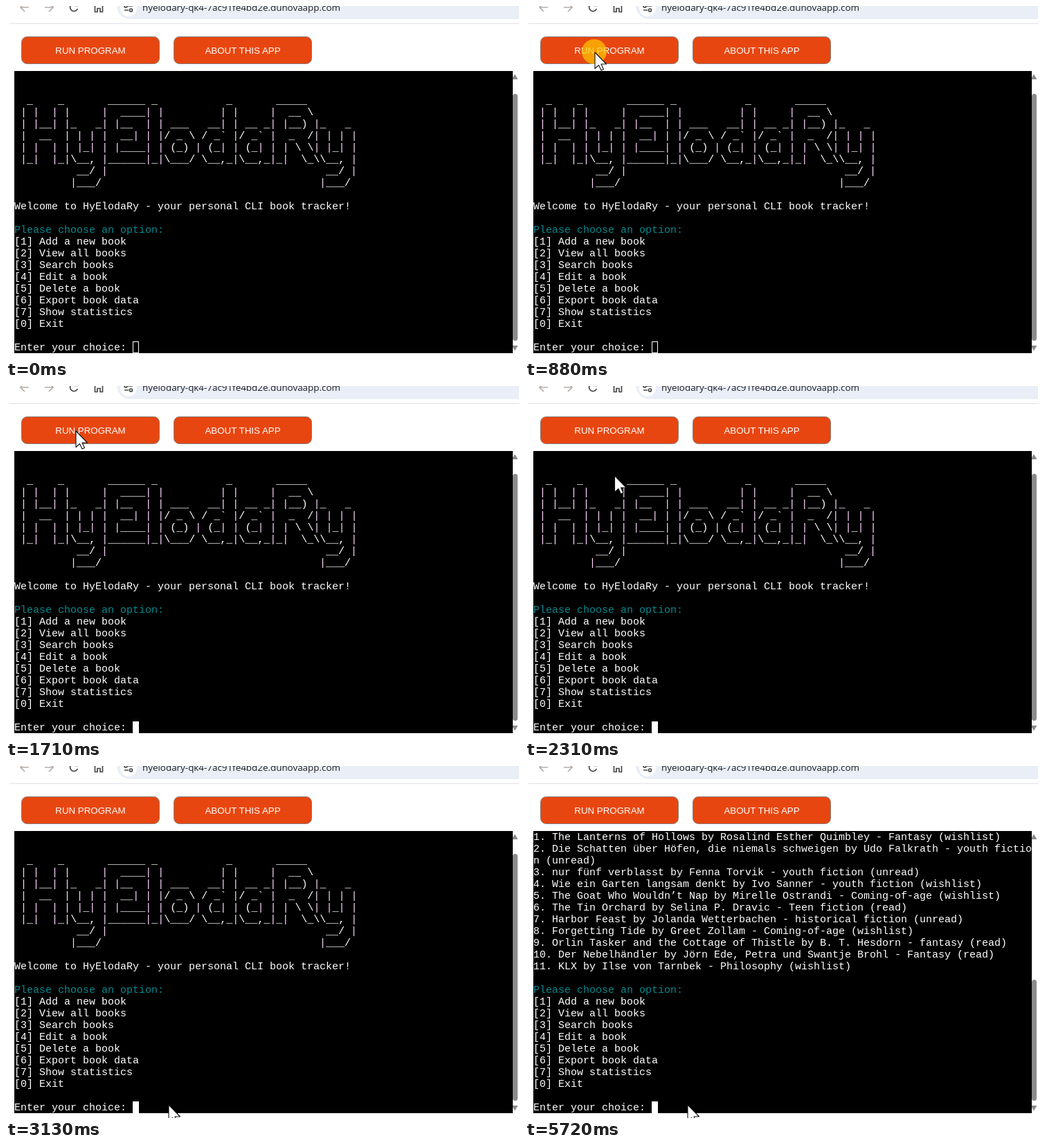
Recreate the animation shown at these times as an HTML page. Size 741 by 509 pixels, loop 8 s.

```html
<!DOCTYPE html>
<html lang="en">
<head>
<meta charset="utf-8">
<title>Book tracker</title>
<style>
  html, body { margin: 0; width: 100%; height: 100%; overflow: hidden; background: #fff; }
  svg { display: block; width: 741px; height: 509px; }
  .term text { font: 15px "Liberation Mono", monospace; fill: #fff; white-space: pre; }
  .term .teal { fill: #058a8f; }
  .term .bar { fill: #ffd6ff; }
  .button rect { fill: #e84610; stroke: #85807c; }
  .button text { font: 13.333px "Liberation Sans", sans-serif; fill: #fff; text-anchor: middle; }
  .url { font: 13.4px "Open Sans", sans-serif; fill: #1f2023; }
  .icon { fill: none; stroke: #47484b; stroke-width: 1.7; }
  .off { stroke: #b5aca6; }
</style>
</head>
<body>
<svg viewBox="0 0 741 509">
  <rect width="741" height="509" fill="#fff"/>
  <rect x="5" y="25" width="736" height="1" fill="#dfe1e5"/>
  <rect x="160" y="-20" width="700" height="39" rx="19.5" fill="#e9eef7"/>
  <circle cx="177" cy="3" r="12" fill="#fff"/>
  <path class="icon off" d="M33 2H21M27 -4L21 2L27 8M56 2H68M62 -4L68 2L62 8"/>
  <path class="icon" id="reload" d="M103 -1A5.6 5.6 0 1 0 103.4 4M103.5 -5V-0.5H99"/>
  <path class="icon" id="stop" d="M93 -3L103 7M103 -3L93 7"/>
  <path class="icon" d="M128.5 0V8.5H132V3.5H136V8.5H139.5V0L134 -4Z"/>
  <g class="icon">
    <path d="M176 0H183M171 6H177"/>
    <circle cx="173" cy="0" r="2"/>
    <circle cx="180.5" cy="6" r="2"/>
  </g>
  <text class="url" x="197" y="7">hyelodary-qk4-7ac91fe4bd2e.dunovaapp.com</text>

  <g class="button">
    <rect x="22.5" y="44.5" width="199" height="39" rx="8"/>
    <text x="122" y="69">RUN PROGRAM</text>
    <rect x="242.5" y="44.5" width="199" height="39" rx="8"/>
    <text x="342" y="69">ABOUT THIS APP</text>
  </g>

  <g fill="#8b8b8b">
    <path d="M735 98.5L739.5 106H730.5ZM735 498.5L739.5 491H730.5Z"/>
    <rect id="thumb" x="732" width="7" rx="3.5"/>
  </g>
  <rect x="12" y="94" width="720" height="408" fill="#000"/>
  <g class="term" id="term"></g>
  <rect id="caret" stroke="#fff"/>

  <circle id="press" cx="100" cy="66" r="18" fill="#ffc800"/>
  <path id="mouse" d="M0 0V23.5L5.5 18.5L9 26L12.5 24.5L9 17H16.5Z"
        fill="#fff" stroke="#111" stroke-width="1.1" stroke-linejoin="round"/>
</svg>

<script>
const LOOP = 8000;
const CELL_W = 9, CELL_H = 17, LEFT = 12, TOP = 94, COLS = 80;
const $ = id => document.getElementById(id);
const set = (el, attrs) => {
  for (const key in attrs) el.setAttribute(key, attrs[key]);
};

const gap = " ".repeat(35);
const banner = [
  "", "",
  "  _    _       ______ _           _       _____",
  " | |  | |     |  ____| |         | |     |  __ \\",
  " | |__| |_   _| |__  | | ___   __| | __ _| |__) |_   _",
  " |  __  | | | |  __| | |/ _ \\ / _` |/ _` |  _  /| | | |",
  " | |  | | |_| | |____| | (_) | (_| | (_| | | \\ \\| |_| |",
  " |_|  |_|\\__, |______|_|\\___/ \\__,_|\\__,_|_|  \\_\\\\__, |",
  "          __/ |" + gap + " __/ |".slice(1).padStart(5),
  "         |___/" + gap + "|___/",
  "",
  "Welcome to HyElodaRy - your personal CLI book tracker!"
];
const books = [
  "The Lanterns of Hollows by Rosalind Esther Quimbley - Fantasy (wishlist)",
  "Die Schatten über Höfen, die niemals schweigen by Udo Falkrath - youth fiction (unread)",
  "nur fünf verblasst by Fenna Torvik - youth fiction (unread)",
  "Wie ein Garten langsam denkt by Ivo Sanner - youth fiction (wishlist)",
  "The Goat Who Wouldn’t Nap by Mirelle Ostrandi - Coming-of-age (wishlist)",
  "The Tin Orchard by Selina P. Dravic - Teen fiction (read)",
  "Harbor Feast by Jolanda Wetterbachen - historical fiction (unread)",
  "Forgetting Tide by Greet Zollam - Coming-of-age (wishlist)",
  "Orlin Tasker and the Cottage of Thistle by B. T. Hesdorn - fantasy (read)",
  "Der Nebelhändler by Jörn Ede, Petra und Swantje Brohl - Fantasy (read)",
  "KLX by Ilse von Tarnbek - Philosophy (wishlist)"
];
const wrap = line => line.match(new RegExp(`.{1,${COLS}}`, "g"));
const list = books.flatMap((book, i) => wrap(`${i + 1}. ${book}`));

const prompt = "Enter your choice: ";
const menu = [
  "", "Please choose an option:",
  "[1] Add a new book", "[2] View all books", "[3] Search books",
  "[4] Edit a book", "[5] Delete a book", "[6] Export book data",
  "[7] Show statistics", "[0] Exit", "", prompt
];
const home = [...banner, ...menu];

// thumb: [top, height] of the scrollbar handle
const screens = [
  { from: 0, lines: home, caret: [19, 23], hollow: true, thumb: [127, 357] },
  { from: 1420, lines: ["Running startup command: python3 run.py"], caret: [0, 2], thumb: [127, 0] },
  { from: 1640, lines: home, caret: [19, 23], thumb: [127, 357] },
  { from: 4590, lines: [...home.slice(0, -1), prompt + "2"], caret: [20, 23], thumb: [127, 357] },
  { from: 5720, lines: [...list, ...menu], caret: [19, 23], thumb: [309, 175] }
];

function rowMarkup(line, row) {
  const teal = line.startsWith("Please") ? ' class="teal"' : "";
  const body = line.replace(/\|+/g, '<tspan class="bar">$&</tspan>');
  return `<text x="${LEFT}" y="${TOP + row * CELL_H + 13}"${teal} xml:space="preserve">${body}</text>`;
}

let shown = null;
function showScreen(screen) {
  if (screen === shown) return;
  shown = screen;
  $("term").innerHTML = screen.lines.map(rowMarkup).join("");
  const [col, row] = screen.caret;
  const inset = screen.hollow ? 0.5 : 0;
  set($("caret"), {
    x: LEFT + col * CELL_W + inset, y: TOP + row * CELL_H + inset,
    width: CELL_W - 2 * inset, height: CELL_H - 2 * inset,
    fill: screen.hollow ? "none" : "#fff", "stroke-width": screen.hollow ? 1 : 0
  });
  set($("thumb"), { y: screen.thumb[0], height: screen.thumb[1] });
}

// Pointer keys: [time, x, y]
const enter = [[70, 666, 495], [205, 522, 375], [340, 368, 243], [475, 208, 78], [610, 101, 66]];
const leave = [[2240, 112, 92], [2310, 130, 131], [2450, 174, 245], [2650, 226, 400],
               [2800, 244, 468], [2990, 236, 491]];
const rests = [[610, 101, 66], [810, 101, 67], [1280, 101, 65], [2100, 101, 63]];
const settle = [[2990, 236, 491], [3060, 234, 491], [3130, 235, 490]];

const hold = (keys, t) => keys.filter(k => k[0] <= t).pop().slice(1);

// Samples a path at evenly spaced steps, as a screen recorder would
function glide(keys, t, steps) {
  const start = keys[0][0], end = keys[keys.length - 1][0];
  const step = (end - start) / (steps - 1);
  const time = start + Math.floor((t - start) / step + 0.001) * step;
  const i = Math.max(1, keys.findIndex(k => k[0] >= time));
  const [t0, x0, y0] = keys[i - 1], [t1, x1, y1] = keys[i];
  const p = (time - t0) / (t1 - t0);
  return [x0 + (x1 - x0) * p, y0 + (y1 - y0) * p];
}

function pointerAt(t) {
  if (t < 70) return [-50, -50];
  if (t < 610) return glide(enter, t, 9);
  if (t < 2240) return hold(rests, t);
  if (t < 2990) return glide(leave, t, 12);
  return hold(settle, t);
}

function pressAt(t) {
  if (t < 810 || t >= 1220) return 0;
  return t < 1010 ? 0.7 : 0.7 - 0.2 * (1 + Math.floor((t - 1010) / 70));
}

function draw(t) {
  showScreen(screens.filter(s => s.from <= t).pop());
  const loading = t >= 1280 && t < 1640;
  set($("reload"), { visibility: loading ? "hidden" : "visible" });
  set($("stop"), { visibility: loading ? "visible" : "hidden" });
  set($("press"), { opacity: Math.max(0, pressAt(t)) });
  set($("mouse"), { transform: `translate(${pointerAt(t)})` });
}

const began = performance.now();
function tick() {
  draw((performance.now() - began) % LOOP);
  requestAnimationFrame(tick);
}
tick();
</script>
</body>
</html>
```
